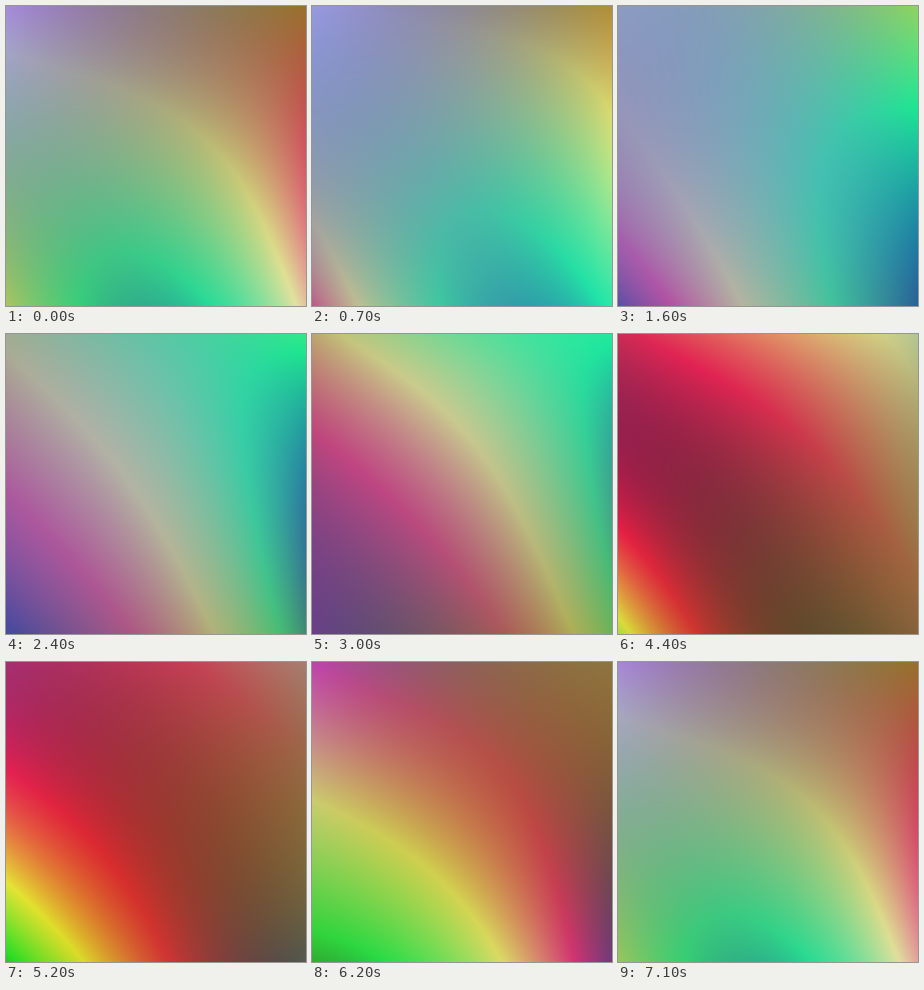
Recreate the animation shown at these times as an HTML page with a canvas. Size 300 by 300 pixels, loop 7.2 s.

```html
<!DOCTYPE html>
<html lang="en">
<head>
<meta charset="utf-8">
<title>Drifting colour field</title>
<style>
  html, body { margin: 0; width: 100%; height: 100%; overflow: hidden; }
  canvas { display: block; width: 300px; height: 300px; }
</style>
</head>
<body>
<canvas width="300" height="300"></canvas>
<script>
const SIZE = 300, LOOP = 7200, STEP = 100, MID = 130;
const ctx = document.querySelector('canvas').getContext('2d');
const image = ctx.createImageData(SIZE, SIZE);
const pixels = image.data.fill(255);

// Each pixel's position from -1 to 1, and a bowl-shaped curve over it
const axis = Array.from({ length: SIZE }, (_, i) => {
  const u = (2 * i + 1) / SIZE - 1;
  return { u, bowl: (9 * u * u - 5) / 4 };
});

// A tilted, twisted and bent sheet over the stage
const sheet = ({ level, x, y, twist, bendX, bendY, flareX, flareY }) => (h, v) =>
  level + x * h.u + y * v.u + twist * h.u * v.u +
  bendX * h.bowl + bendY * v.bowl +
  flareX * h.bowl * v.u + flareY * h.u * v.bowl;

// Phase runs round the red-green square: -1 green, 0 yellow, 1 red, 2 dark
const phaseAt = (c, s) => sheet({
  level: .28 - .27 * c - .65 * s,
  x: -.18 + .57 * c - .78 * s,
  y: -.63 * c + .29 * s,
  twist: .06 - .1 * c - .92 * s,
  bendX: .23 * c + .09 * s,
  bendY: .07 * c + .14 * s,
  flareX: .31 * c,
  flareY: .03 - .21 * c - .07 * s
});

const strengthAt = (c, s) => sheet({
  level: 61.5 - 8.3 * c - 5.6 * s,
  x: .7 + 10.6 * c + 28.6 * s,
  y: 6 + 25 * c - 2 * s,
  twist: -2.5 + 13 * c - 5 * s,
  bendX: 1 + 2.4 * c + 6.5 * s,
  bendY: -1.8 * c,
  flareX: -5 * c + .8 * s,
  flareY: -.9 - 6 * c - 6 * s
});

const blueAt = (c, s) => sheet({
  level: 116.5 + 13.5 * c + 46 * s,
  x: -9 - 19 * c - 8.7 * s,
  y: -11 + 14.7 * c + 10 * s,
  twist: 16 + 44 * c - 3 * s,
  bendX: 1.3 - 2.6 * c - 6.3 * s,
  bendY: 1.5 * c - 8.7 * s,
  flareX: -5 * c + 6 * s,
  flareY: -7.5 * s
});

const clamp = (value, low, high) => Math.max(low, Math.min(high, value));

// Flat-topped wave with period 4, high from 0 to 1 and low from 2 to 3
function wave(p) {
  const q = p + 1.5;
  return clamp(2 - 2 * Math.abs(q - 4 * Math.floor(q / 4) - 2), -1, 1);
}

function draw(t) {
  const angle = t / LOOP * 2 * Math.PI;
  const [phase, strength, blue] = [phaseAt, strengthAt, blueAt]
    .map(field => field(Math.cos(angle), Math.sin(angle)));
  let o = 0;
  for (const v of axis) {
    for (const h of axis) {
      const p = phase(h, v), r = clamp(strength(h, v), 0, 100);
      pixels[o] = MID + r * wave(p);
      pixels[o + 1] = MID + r * wave(p + 1);
      pixels[o + 2] = blue(h, v);
      o += 4;
    }
  }
  ctx.putImageData(image, 0, 0);
}

const begin = performance.now();
let shown = -1;
function tick() {
  const elapsed = Math.max(0, performance.now() - begin) % LOOP;
  const t = Math.floor(elapsed / STEP) * STEP;
  if (t !== shown) draw(shown = t);
  requestAnimationFrame(tick);
}
tick();
</script>
</body>
</html>
```
